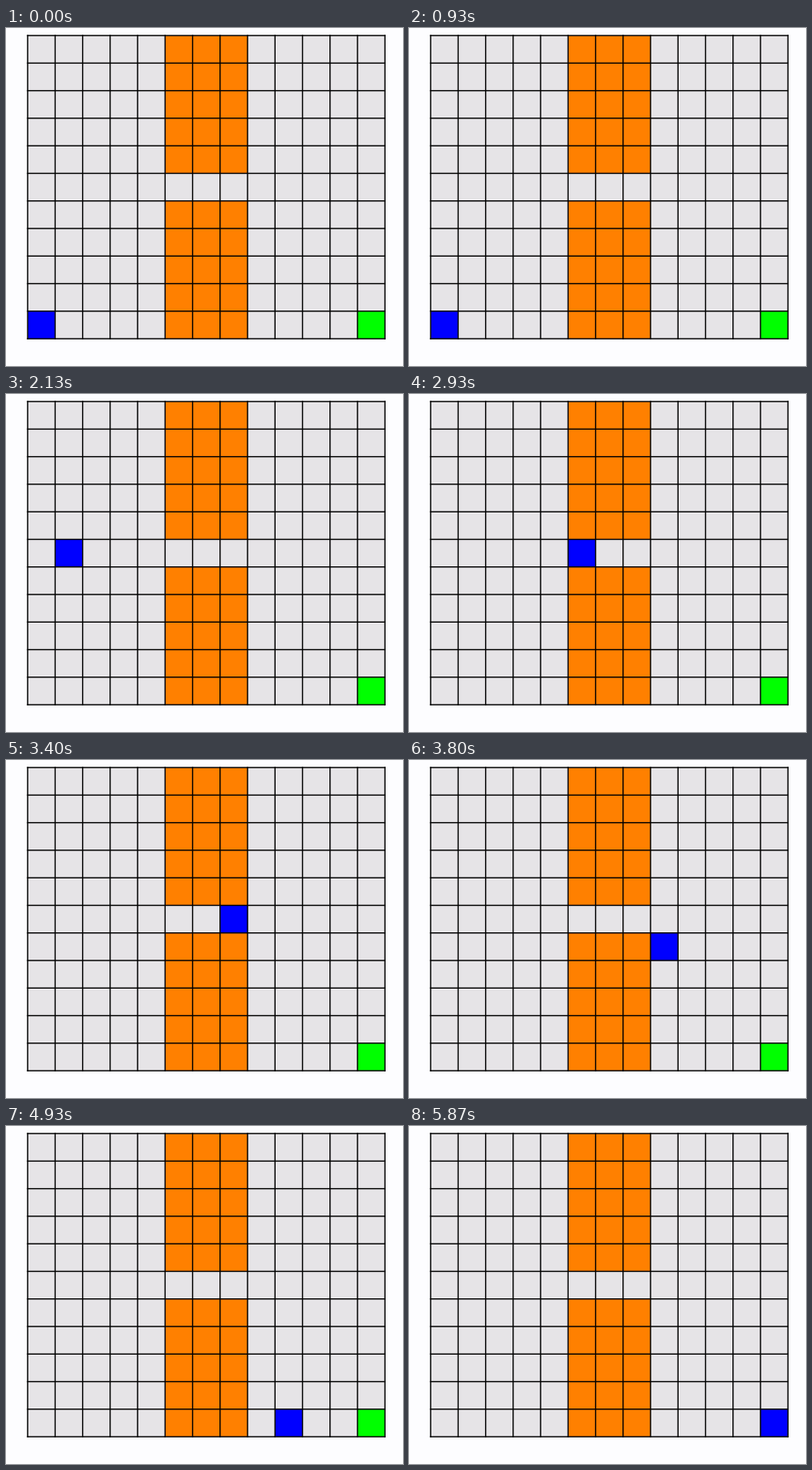
These frames come from a looping animation (480x408 px, 5940 ms). A matplotlib script:

```python
import matplotlib.pyplot as plt
from matplotlib.animation import FuncAnimation
from matplotlib.collections import LineCollection
from matplotlib.patches import Rectangle

W, H, DPI = 480, 408, 100
COLS, ROWS = 13, 11
LEFT, TOP, RIGHT, BOTTOM = 26.2, 9.1, 458.2, 375.1
LOOP, STEP = 5940, 20

BACK, FLOOR, WALL = "#fdfdff", "#e6e4e7", "#ff8000"
GOAL, AGENT, LINE = "#00ff00", "#0000ff", "#000000"

# Agent route and the tick (1/15 s) at which each move happens
ROUTE = "U" * 5 + "R" * 8 + "D" * 5 + "R" * 4
TICKS = [15, 18, 22, 25, 28,
         31, 34, 37, 41, 44, 47, 51, 54,
         57, 60, 64, 67, 70,
         73, 77, 80, 83]
MOVES = {"U": (0, -1), "D": (0, 1), "R": (1, 0)}

xs = [LEFT + (RIGHT - LEFT) * i / COLS for i in range(COLS + 1)]
ys = [TOP + (BOTTOM - TOP) * j / ROWS for j in range(ROWS + 1)]

fig = plt.figure(figsize=(W / DPI, H / DPI), dpi=DPI, facecolor=BACK)
ax = fig.add_axes([0, 0, 1, 1])
ax.set_xlim(0, W)
ax.set_ylim(H, 0)
ax.axis("off")


def block(col, row, color, cols=1, rows=1, z=1):
    """Fill a block of grid cells."""
    x, y = xs[col], ys[row]
    rect = Rectangle((x, y), xs[col + cols] - x, ys[row + rows] - y,
                     facecolor=color, linewidth=0, snap=False, zorder=z)
    return ax.add_patch(rect)


block(0, 0, FLOOR, COLS, ROWS)
block(5, 0, WALL, 3, 5, z=2)
block(5, 6, WALL, 3, 5, z=2)
block(12, 10, GOAL, z=2)
agent = block(0, 10, AGENT, z=3)

grid = [[(x, ys[0]), (x, ys[-1])] for x in xs]
grid += [[(xs[0], y), (xs[-1], y)] for y in ys]
lines = LineCollection(grid, colors=LINE, linewidths=1.45 * 72 / DPI,
                       capstyle="projecting", zorder=4)
lines.set_snap(False)
ax.add_collection(lines)

cells = [(0, 10)]
for move in ROUTE:
    dx, dy = MOVES[move]
    cells.append((cells[-1][0] + dx, cells[-1][1] + dy))


def update(i):
    now = (i + 0.75) * STEP
    done = sum(tick * 1000 / 15 <= now for tick in TICKS)
    col, row = cells[done]
    agent.set_xy((xs[col], ys[row]))
    return [agent]


anim = FuncAnimation(fig, update, frames=LOOP // STEP, interval=STEP,
                     init_func=lambda: update(0), repeat=True, repeat_delay=0)
plt.show()
```
